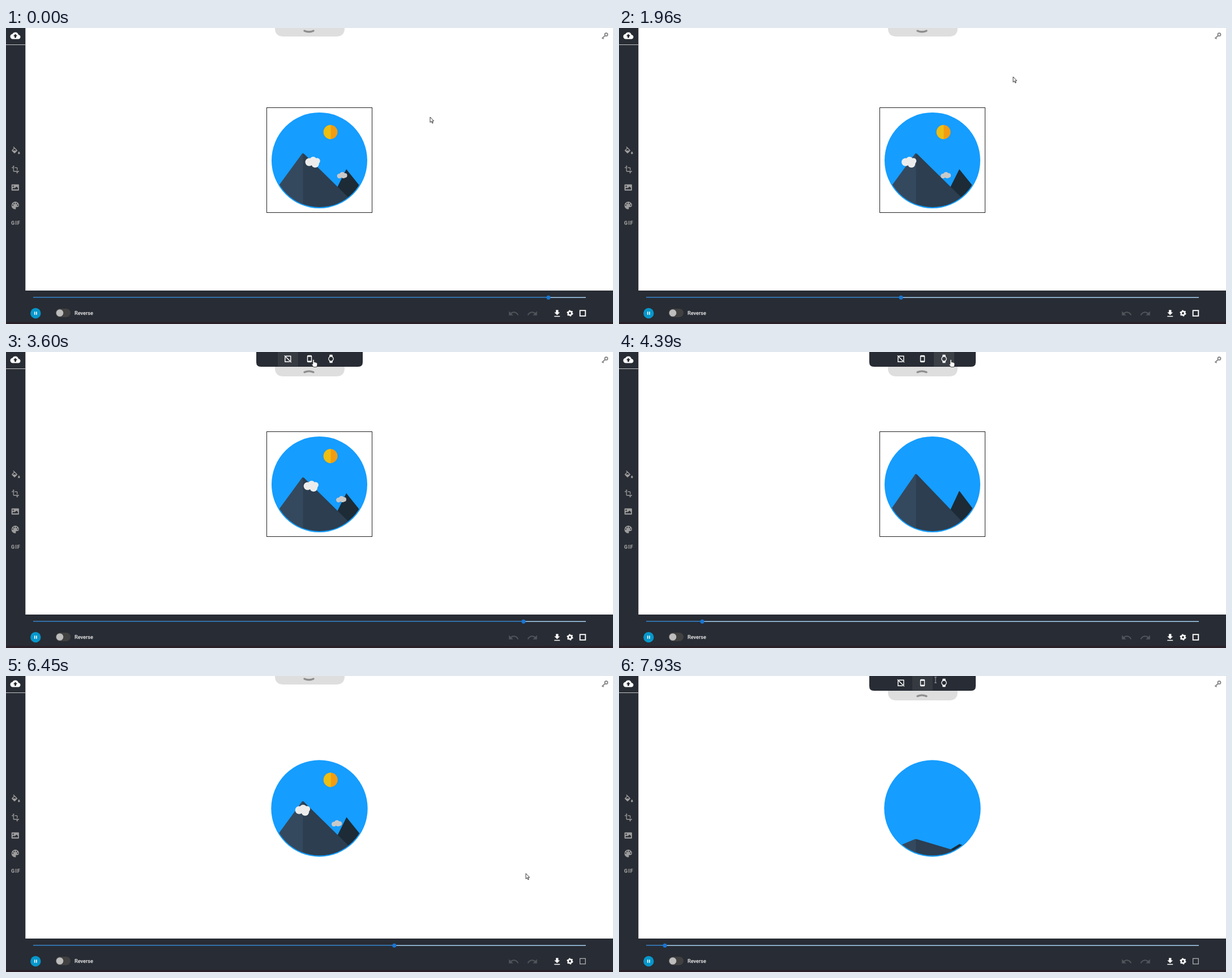
Write an HTML page that moves like this. It is 1072 px wide and 522 px high and loops after 8 s.

```html
<!DOCTYPE html>
<html lang="en">
<head>
<meta charset="utf-8">
<title>Icon animation editor</title>
<style>
html, body { margin: 0; width: 100%; height: 100%; overflow: hidden; background: #fff; }
svg { display: block; width: 1072px; height: 522px; }
text { font-family: Roboto, Arial, sans-serif; }
</style>
</head>
<body>
<svg id="stage" viewBox="0 0 1072 522">
  <defs>
    <clipPath id="disc"><circle cx="553.5" cy="233.5" r="84.5"/></clipPath>
    <clipPath id="ground"><circle cx="553.5" cy="233.5" r="82.4"/></clipPath>
  </defs>
  <rect width="1072" height="522" fill="#fff"/>

  <g id="picture">
    <rect id="frame" x="460.5" y="140.5" width="186" height="185" fill="#fff" stroke="#222"/>
    <circle id="sky" cx="553.5" cy="233.5" r="84.5" fill="#159dff"/>
    <g clip-path="url(#disc)">
      <g id="sun">
        <circle cx="573" cy="183.5" r="12.5" fill="#f39c12"/>
        <path d="M573.5 171a12.5 12.5 0 0 0 0 25z" fill="#ecbf14"/>
      </g>
    </g>
    <g clip-path="url(#ground)">
      <g id="mountains">
        <path d="M601 249L547 357H688z" fill="#1c2b36"/>
        <path d="M522 223.200Q524 219.500 527 222.500L664 357H424z" fill="#2c3e50"/>
        <path d="M522 223.200Q523 221 524.500 221V357H424z" fill="#34495e"/>
      </g>
    </g>
    <g id="bigCloud" fill="#ececec">
      <circle cx="7" cy="9.500" r="7"/><circle cx="14" cy="6.500" r="6.500"/>
      <circle cx="21" cy="7.500" r="5.200"/><circle cx="17.500" cy="12.500" r="6.800"/>
    </g>
    <g id="smallCloud" fill="#c9c9c9">
      <circle cx="4.300" cy="7" r="4.200"/><circle cx="9.500" cy="5" r="5"/>
      <circle cx="14.200" cy="6" r="3.900"/><circle cx="11.500" cy="7" r="4"/>
    </g>
  </g>

  <g id="handle">
    <path d="M475 -30H598V0Q598 15 583 15H490Q475 15 475 0z" fill="#dedede"/>
    <path id="chevron" d="M527 5Q535 8.500 543 5" fill="none" stroke="#8e8e8e" stroke-width="3.400" stroke-linecap="round"/>
  </g>
  <g id="panel">
    <path d="M442 -30H630V18Q630 26 622 26H450Q442 26 442 18z" fill="#282c34"/>
    <g fill="#3b3f46">
      <rect class="choice" x="480" y="-4" width="36" height="29.500"/>
      <rect class="choice" x="518" y="-4" width="36" height="29.500"/>
      <rect class="choice" x="556" y="-4" width="36" height="29.500"/>
    </g>
    <g fill="none" stroke="#fff" stroke-width="1.400">
      <path d="M494 7.200H502.800V16M501 17.200H492.800V8.500M491.800 6.200L503.800 18.200"/>
      <rect x="532.500" y="6.500" width="7" height="11" rx="1"/>
      <path d="M532.500 7.500H539.500M532.500 16.500H539.500" stroke-width="2"/>
    </g>
  </g>

  <rect width="34.300" height="522" fill="#282c34"/>
  <rect y="463" width="1072" height="59" fill="#282c34"/>
  <rect y="518.500" width="1072" height="3.500" fill="#2a2027"/>
  <rect y="29" width="34.300" height="1" fill="#c4c5c7"/>
  <text x="9" y="347.300" font-size="9" font-weight="900" letter-spacing="1" fill="#9c9c9c">GIF</text>

  <g fill="none" stroke="#8b8b8b" stroke-width="2">
    <circle cx="1060" cy="11.500" r="2.500"/>
    <path d="M1058.200 13.300L1052.500 18.500M1053 17L1055.500 19.200"/>
  </g>

  <path d="M48 475.300H1024" stroke="#a5d2f3" stroke-width="1.400"/>
  <path id="played" stroke="#236bad" stroke-width="1.600"/>
  <circle id="knob" cy="475.300" r="3.600" fill="#1976d2"/>

  <circle cx="52.300" cy="503" r="9.200" fill="#0797cb"/>
  <path d="M50.700 500.300V505.700M53.900 500.300V505.700" stroke="#fff" stroke-width="1.600"/>
  <rect x="87.500" y="495" width="26.500" height="15" rx="7.500" fill="#414141"/>
  <circle cx="95" cy="502.500" r="6.300" fill="#bdbdbd"/>
  <text x="121" y="505.500" font-size="9.200" font-weight="500" fill="#f4f4f4">Reverse</text>

  <circle id="hover" cx="1018.500" cy="503" r="11" fill="#3d4148"/>
  <rect id="square" x="1013.700" y="498.200" width="9.600" height="9.600" fill="none"/>
  <g fill="none" stroke="#fff">
    <circle cx="996" cy="503" r="3.200" stroke-width="2.600"/>
    <circle cx="996" cy="503" r="4.700" stroke-width="1.800" stroke-dasharray="2.460"/>
  </g>

  <path id="arrow" d="M0 0V9.500L2.200 7.500L3.800 11L5.300 10.300L3.700 7H6.600z" fill="#fff" stroke="#222" stroke-width=".9"/>
  <path id="hand" d="M-1.200 .8Q0 -.8 1.200 .8V5Q2.600 4.200 3.300 5.300Q5 4.800 5.500 6.200Q6.800 6.200 6.800 7.500V10L5.600 13.500H.2L-3 9.200Q-3.300 7.300 -1.200 8.500z" fill="#fff" stroke="#222" stroke-width=".8"/>
  <path id="beam" d="M-2 -5H2M0 -5V5M-2 5H2" fill="none" stroke="#aaa"/>
</svg>
<script>
const $ = id => document.getElementById(id);
const CENTER = { x: 553.5, y: 233.5 };

// Material-style glyphs on a 24-unit grid
const GLYPHS = {
  upload: 'M19.35 10.04C18.67 6.59 15.64 4 12 4 9.11 4 6.6 5.64 5.35 8.04 2.34 8.36 0 10.91 0 14c0 3.31 2.69 6 6 6h13c2.76 0 5-2.24 5-5 0-2.64-2.05-4.78-4.65-4.96zM14 13v4h-4v-4H7l5-5 5 5h-3z',
  fill: 'M16.56 8.94L7.62 0 6.21 1.41l2.38 2.38-5.15 5.15c-.59.59-.59 1.54 0 2.12l5.5 5.5c.29.29.68.44 1.06.44s.77-.15 1.06-.44l5.5-5.5c.59-.58.59-1.53 0-2.12zM5.21 10L10 5.21 14.79 10H5.21zM21 12s-2.5 2.8-2.5 4.500a2.500 2.500 0 0 0 5 0c0-1.700-2.500-4.500-2.500-4.500z',
  crop: 'M22 18v-2H8V4h2L7 1 4 4h2v2H2v2h4v8c0 1.1.9 2 2 2h8v2h-2l3 3 3-3h-2v-2h4zM10 8h6v6h2V8c0-1.1-.9-2-2-2h-6v2z',
  image: 'M3 3h18q2 0 2 2v14q0 2-2 2H3q-2 0-2-2V5q0-2 2-2zM4 17.500h16v-4l-4-4-6 5-3-2-3 3zM6 6a2 2 0 0 0 0 4a2 2 0 0 0 0-4z',
  palette: 'M12 2a10 10 0 0 0 0 20q2 0 2-2q0-1-.5-1.500q-.8-2.500 2-2.500h2.500q4 0 4-5c0-5-5-9-10-9zM5.500 9.500a1.700 1.700 0 1 0 .1 0zM9 5a1.700 1.700 0 1 0 .1 0zM15 5a1.700 1.700 0 1 0 .1 0zM18.500 9.500a1.700 1.700 0 1 0 .1 0z',
  undo: 'M12.5 8c-2.65 0-5.05.99-6.9 2.6L2 7v9h9l-3.62-3.62c1.39-1.16 3.16-1.88 5.12-1.88 3.54 0 6.55 2.31 7.6 5.5l2.37-.78C21.08 11.03 17.15 8 12.5 8z',
  download: 'M19 9h-4V3H9v6H5l7 7 7-7zM5 18v2h14v-2H5z',
  watch: 'M20 12c0-2.54-1.19-4.81-3.04-6.27L16 0H8l-.95 5.73C5.19 7.19 4 9.45 4 12s1.19 4.81 3.05 6.27L8 24h8l.96-5.73C18.81 16.81 20 14.54 20 12zM6 12c0-3.31 2.69-6 6-6s6 2.69 6 6-2.69 6-6 6-6-2.69-6-6z'
};

function addIcon(name, x, y, size, color, parent = $('stage'), flip = 1) {
  const path = document.createElementNS('http://www.w3.org/2000/svg', 'path');
  const scale = size / 24;
  path.setAttribute('d', GLYPHS[name]);
  path.setAttribute('fill', color);
  path.setAttribute('fill-rule', 'evenodd');
  path.setAttribute('transform', `translate(${x} ${y}) scale(${flip * scale} ${scale}) translate(-12 -12)`);
  parent.insertBefore(path, parent === $('stage') ? $('arrow') : null);
}
addIcon('upload', 16.5, 13.5, 18, '#fff');
addIcon('fill', 16.5, 217.5, 17, '#9c9c9c');
addIcon('crop', 16.5, 249.5, 15.5, '#9c9c9c');
addIcon('image', 16.3, 281.3, 14.5, '#9c9c9c');
addIcon('palette', 16.3, 313, 16, '#9c9c9c');
addIcon('undo', 896.5, 503.5, 20, '#50545b');
addIcon('undo', 929.5, 503.5, 20, '#50545b', undefined, -1);
addIcon('download', 973.3, 503.5, 17, '#fff');
addIcon('watch', 574, 12, 14.5, '#fff', $('panel'));

const clamp = v => Math.min(1, Math.max(0, v));
const smooth = v => v * v * (3 - 2 * v);
const ramp = (v, from, to) => clamp((v - from) / (to - from));

// Interpolates [position, value] pairs
function along(keys, at, ease = v => v) {
  const next = keys.findIndex(key => key[0] > at);
  if (next < 0) return keys[keys.length - 1][1];
  if (next === 0) return keys[0][1];
  const [a, b] = [keys[next - 1], keys[next]];
  return a[1] + (b[1] - a[1]) * ease((at - a[0]) / (b[0] - a[0]));
}

const LOOP = 8000, TICKS = 102, STEP = LOOP / TICKS;
const TRACK = { left: 48, length: 976 };

// Distance played along the track, continuing across restarts
const played = [[0, 910], [11, 1130], [22, 1360], [25, 1426], [44, 1809], [46, 1842], [55, 2029], [56, 2051],
  [66, 2259], [73, 2412], [93, 2807], [99, 2927.9], [100, 2928.1], [101, 2961]];
const mountainScale = [[0, 0], [.034, .305], [.075, .88], [.101, 1.063], [.15, 1]];
const cursorX = [[22, 749], [25, 696], [31, 540], [45, 541], [46, 543], [53, 586], [58, 586], [66, 1034],
  [69, 1021], [75, 1021], [78, 1042], [88, 690], [92, 541], [95, 541], [101, 559]];
const cursorY = [[22, 157], [25, 86], [31, 9], [46, 13], [58, 13], [66, 470],
  [69, 507], [75, 507], [78, 507], [88, 56], [92, 7], [95, 6], [101, 7]];
const panelOpen = [[32.2, 0], [33, .25], [34, .68], [36, 1], [64, 1], [68, 0], [92, 0], [93, .38], [94, .74], [96, 1]];

const move = (id, transform) => $(id).setAttribute('transform', transform);
const show = (id, visible) => $(id).setAttribute('visibility', visible ? 'visible' : 'hidden');

function drawPicture(progress, framed) {
  show('frame', framed);
  const zoom = framed ? 1 : 1.008;
  move('picture', `translate(${CENTER.x} ${CENTER.y}) scale(${zoom}) translate(${-CENTER.x} ${-CENTER.y})`);
  move('mountains', `translate(0 316) scale(1 ${along(mountainScale, progress)}) translate(0 -316)`);

  const drop = 1 - (1 - ramp(progress, .2, .3)) ** 3;
  move('sun', `translate(0 ${-50 * (1 - drop)})`);

  const pop = smooth(ramp(progress, .28, .35));
  const drift = progress - .461;
  move('bigCloud', `translate(${512 + 62.6 * drift} 236.5) scale(${pop}) translate(-13 -9.5)`);
  move('smallCloud', `translate(${577 + 35 * drift} 259.5) scale(${pop}) translate(-9 -5.5)`);
}

function drawPanel(tick) {
  const open = along(panelOpen, tick);
  move('panel', `translate(0 ${28 * (open - 1)})`);
  move('handle', `translate(0 ${28 * open})`);
  move('chevron', `rotate(${-180 * open ** 2.5} 535 6.300)`);
  const choices = [tick < 55 ? .75 : 0, tick > 97 ? .7 : tick > 43 && tick < 53 ? .15 : 0, tick >= 55 && tick < 96 ? 1 : 0];
  document.querySelectorAll('.choice').forEach((box, i) => box.setAttribute('opacity', choices[i]));
}

function drawCursor(tick) {
  const pointing = (tick >= 31 && tick < 60) || (tick >= 68 && tick < 79) || (tick >= 92 && tick < 98);
  const kind = tick >= 98 ? 'beam' : pointing ? 'hand' : 'arrow';
  for (const id of ['arrow', 'hand', 'beam']) show(id, id === kind);
  move(kind, `translate(${along(cursorX, tick, smooth)} ${along(cursorY, tick, smooth)})`);
}

function draw(time) {
  const tick = Math.min(TICKS - 1, Math.floor((time % LOOP + 14) / STEP));
  const distance = along(played, tick) % TRACK.length;
  const x = TRACK.left + distance;
  const framed = tick < 75;
  $('played').setAttribute('d', `M${TRACK.left} 475.300H${x}`);
  $('knob').setAttribute('cx', x);
  $('square').setAttribute('stroke', framed ? '#fff' : '#b9babd');
  $('square').setAttribute('stroke-width', framed ? 1.9 : 1.2);
  show('hover', tick >= 68 && tick < 79);
  drawPicture(distance / TRACK.length, framed);
  drawPanel(tick);
  drawCursor(tick);
}

const start = performance.now();
function loop() {
  draw(performance.now() - start);
  requestAnimationFrame(loop);
}
loop();
</script>
</body>
</html>
```
